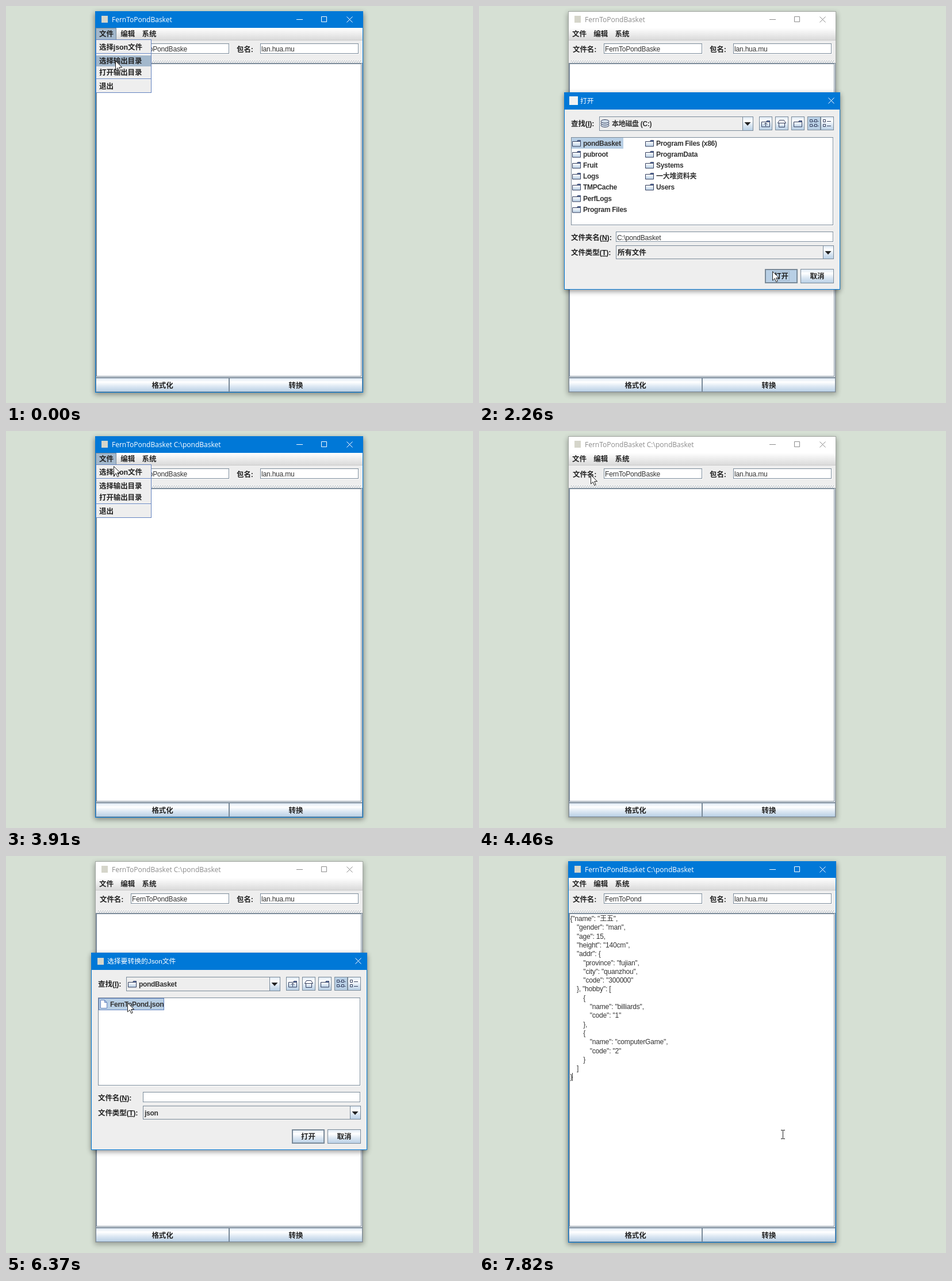
An HTML page for the animation above (8 s loop, 812x690 px).

```html
<!DOCTYPE html>
<html lang="zh">
<head>
<meta charset="utf-8">
<title>Converter demo</title>
<style>
html, body { margin: 0; width: 100%; height: 100%; overflow: hidden; background: #d6e0d4; }
svg { display: block; width: 100vw; height: 100vh; }
text { font: 12px "Liberation Sans", "Noto Sans CJK SC", "Noto Sans CJK", sans-serif; letter-spacing: -.18px; fill: #333; }
.b { font-weight: 700; letter-spacing: -.3px; }
.c { font-size: 12.5px; font-weight: 700; letter-spacing: -.1px; fill: #222; }
.t { font-family: "Open Sans", "Noto Sans CJK SC", "Noto Sans CJK", sans-serif; letter-spacing: 0; }
.w { font-size: 11.8px; fill: #fff; letter-spacing: 0; }
</style>
</head>
<body>
<svg viewBox="0 0 812 690">
  <defs>
    <linearGradient id="btn" x2="0" y2="1">
      <stop stop-color="#dde8f3"/><stop offset=".3" stop-color="#fff"/>
      <stop offset=".6" stop-color="#dde8f3"/><stop offset="1" stop-color="#b8cfe5"/>
    </linearGradient>
    <linearGradient id="bar" x2="0" y2="1"><stop stop-color="#fff"/><stop offset="1" stop-color="#dadada"/></linearGradient>
    <linearGradient id="fold" x2="0" y2="1"><stop stop-color="#fff"/><stop offset="1" stop-color="#b8cfe5"/></linearGradient>
    <pattern id="bumps" x="159" y="94" width="4" height="4" patternUnits="userSpaceOnUse">
      <path d="M0 0h1v1h-1zM2 2h1v1h-1z" fill="#fff"/><path d="M1 1h1v1h-1zM3 3h1v1h-1z" fill="#7a8a99"/>
    </pattern>
    <filter id="blur" x="-10%" y="-10%" width="120%" height="120%"><feGaussianBlur stdDeviation="5"/></filter>
  </defs>
  <g id="scene"></g>
  <g id="pointer"></g>
</svg>
<script>
const LOOP = 8000, BLUE = '#0078d7', LINE = '#7a8a99', PICK = '#b8cfe5', EDGE = '#6382bf', INK = '#333d5c';
const APP = 'FernToPondBasket', FILE = 'FernToPond', DIR = 'pondBasket';

// Pointer stops: time, x, y
const stops = [
  [0, 190, 95], [150, 194, 101], [510, 198, 128], [640, 202, 160], [770, 206, 195],
  [900, 207, 222], [1040, 205, 232], [1170, 204, 236], [1430, 225, 262], [1570, 290, 320],
  [1710, 380, 385], [1850, 455, 435], [1990, 500, 458], [2120, 510, 461],
  [2940, 480, 400], [3070, 380, 250], [3210, 260, 110], [3340, 185, 48], [3480, 176, 46],
  [3910, 187, 61], [4060, 190, 70], [4180, 194, 76], [4880, 197, 115], [5060, 200, 180],
  [5240, 203, 240], [5430, 204, 254], [6130, 207, 254], [6250, 211, 255], [6620, 235, 285],
  [6740, 330, 370], [6870, 440, 440], [6990, 510, 472], [7120, 528, 478], [7240, 528, 482],
  [7670, 528, 484]
];

const folders = [DIR, 'pubroot', 'Fruit', 'Logs', 'TMPCache', 'PerfLogs', 'Program Files',
  'Program Files (x86)', 'ProgramData', 'Systems', '一大堆资料夹', 'Users'];

// Indent level, then text
const json = [
  [0, '{"name": "王五",'], [1, '"gender": "man",'], [1, '"age": 15,'], [1, '"height": "140cm",'],
  [1, '"addr": {'], [2, '"province": "fujian",'], [2, '"city": "quanzhou",'], [2, '"code": "300000"'],
  [1, '}, "hobby": ['], [2, '{'], [3, '"name": "billiards",'], [3, '"code": "1"'], [2, '},'],
  [2, '{'], [3, '"name": "computerGame",'], [3, '"code": "2"'], [2, '}'], [1, ']'], [0, '}']
];

const rect = (x, y, w, h, fill, more = '') => `<rect x="${x}" y="${y}" width="${w}" height="${h}" fill="${fill}" ${more}/>`;
const box = (x, y, w, h, fill, stroke = LINE) => rect(x + .5, y + .5, w - 1, h - 1, fill, `stroke="${stroke}"`);
const sunken = (x, y, w, h) => rect(x + 1, y + 1, w, h, '#fff') + box(x, y, w, h, '#fff');
const path = (d, stroke, fill = 'none') => `<path d="${d}" stroke="${stroke}" fill="${fill}"/>`;
const text = (x, y, s, cls = '', more = '') => `<text x="${x}" y="${y}" class="${cls}" ${more}>${s}</text>`;
const move = (x, y, s) => `<g transform="translate(${x} ${y})">${s}</g>`;
const shadow = (x, y, w, h, o) => rect(x, y + 3, w, h, '#000', `opacity="${o}" filter="url(#blur)"`);
const key = (s, k) => `${s}(<tspan text-decoration="underline">${k}</tspan>):`;
const mid = 'text-anchor="middle"';
const cross = (x, y, c) => path(`M${x} ${y}l10 10m0-10l-10 10`, c);
const appIcon = (x, y) => rect(x, y, 11, 12, '#d5d5ca');
const caret = (x, y) => rect(x, y, 1, 14, '#333');

const folder = (x, y) => move(x, y,
  path('M8.5 3.5l1-2h5v2', INK, EDGE) + path('M.5 3.5h14v8.5h-14z', INK, 'url(#fold)'));

function mainWindow(s) {
  const ink = s.active ? '#fff' : '#8c8c8c';
  let o = shadow(154, 9, 468, 663, s.active ? .42 : .3);
  o += box(155, 9, 466, 663, '#eee', s.active ? BLUE : '#a0a5a0');
  o += rect(156, 10, 464, 28, s.active ? BLUE : '#fff') + appIcon(166, 17);
  o += text(184, 28, APP + (s.chosen ? ' C:\\' + DIR : ''), 't', `style="fill:${ink}"`);
  o += path('M505 23.5h11M548.5 18.5h9v9h-9z', ink) + cross(592.5, 18.5, ink);

  o += rect(156, 38, 464, 21, 'url(#bar)') + rect(156, 59, 464, 1, '#ccc');
  if (s.menu) o += box(156, 38, 36, 21, '#a3b8cc');
  ['文件', '编辑', '系统'].forEach((m, i) => o += text(162 + i * 37.3, 53, m, 'c'));

  o += text(163, 80, '文件名:', 'c') + text(401, 80, '包名:', 'c');
  o += sunken(217, 65, 171, 18) + sunken(442, 65, 171, 18);
  o += text(219, 79, s.loaded ? FILE : APP.slice(0, -1)) + text(444, 79, 'lan.hua.mu');
  o += rect(159, 94, 459, 4, 'url(#bumps)');

  o += box(156, 99, 464, 547, '#fff') + box(157, 100, 461, 544, '#fff');
  if (s.loaded) {
    json.forEach(([n, line], i) => o += text(158.5 + n * 11.4, 113 + i * 15.3, line));
    o += caret(162, 377);
  }
  [['格式化', 156], ['转换', 388]].forEach(([label, x]) =>
    o += box(x, 646, 232, 25, 'url(#btn)') + text(x + 116, 664, label, 'c', mid));
  return o;
}

function popup(s) {
  let o = box(156, 58, 97, 93, '#eee', EDGE);
  if (s.hover === 1) o += rect(157, 61, 95, 20, '#a3b8cc');
  if (s.hover === 2) o += rect(157, 86, 95, 19, '#a3b8cc');
  for (const y of [82, 126]) o += rect(157, y, 95, 1, EDGE) + rect(157, y + 1, 95, 1, '#fff');
  o += text(162, 76, '选择json文件', 'c') + text(162, 100, '选择输出目录', 'c');
  return o + text(162, 120, '打开输出目录', 'c') + text(162, 144, '退出', 'c');
}

function toolbar() {
  let o = '';
  [487, 515, 543, 571, 594].forEach((x, i) => o += box(x, 192, 23, 24, i === 3 ? PICK : 'url(#btn)'));
  o += folder(491, 198) + path('M498.5 209v-6m-3 3l3-3 3 3', INK);
  o += path('M521.5 203.5h10v7h-10z', INK, 'url(#fold)') + path('M519.5 203.5l3-5h8l3 5z', INK, '#fff');
  o += folder(547, 198);
  for (const x of [575.5, 583.5]) for (const y of [197.5, 205.5]) o += path(`M${x} ${y}h4v4h-4zM${x + 5} ${y + 3}h2`, INK);
  for (const y of [197.5, 205.5]) o += path(`M598.5 ${y}h4v4h-4zM605 ${y + 3}h7`, INK);
  return o;
}

function combo(x, y, w, h) {
  return box(x, y, w, h, '#eee') + box(x + w - 19, y, 19, h, 'url(#btn)') +
    `<path d="M${x + w - 15.5} ${y + 10}h11l-5.5 6z" fill="#222"/>`;
}

function disk() {
  let o = '';
  for (const y of [207.5, 204, 200.5])
    o += `<ellipse cx="219" cy="${y}" rx="7" ry="3" fill="#d3deea" stroke="${INK}"/>`;
  return o;
}

function dialog(s) {
  const json2 = s.dialog === 2;
  let o = shadow(148, 150, 480, 343, .42) + box(148, 150, 480, 343, '#eee', BLUE) + rect(148, 150, 480, 30, BLUE);
  o += json2 ? appIcon(159, 159) : rect(157, 157, 15, 15, '#f2f2f2');
  o += text(176, 169, json2 ? '选择要转换的Json文件' : '打开', 'w') + cross(607.5, 159.5, '#fff');

  o += text(160, 209, key('查找', 'I'), 'c') + combo(209, 192, 268, 25) + toolbar();
  o += s.inside ? folder(212, 198) + text(231, 209, DIR, 'b') : disk() + text(231, 209, '本地磁盘 (C:)', 'b');

  o += sunken(160, 228, 456, 153);
  if (s.inside) {
    if (s.filePick) o += box(161, 229, 114, 21, PICK, EDGE);
    o += path('M164.5 232.5h7l4 4v10h-11zM171.5 232.5v4h4', EDGE, '#fff');
    o += text(181, 244, FILE + '.json', 'b');
  } else {
    if (s.dirPick) o += rect(161, 229, 90, 19, PICK);
    folders.forEach((name, i) => {
      const x = i < 7 ? 162 : 289, y = Math.round(239 + (i % 7) * 19.1);
      o += folder(x, y - 7) + text(x + 19, y + 4, name, 'b');
    });
  }

  o += text(160, 407, key(json2 ? '文件名' : '文件夹名', 'N'), 'c') + sunken(238, 392, 378, 18);
  if (!json2 && !s.dirPick) o += rect(240, 394, 15, 15, PICK);
  o += text(240, 407, s.field);
  if (!s.dirPick && !s.inside) o += caret(json2 ? 240 : 255, 394);
  o += text(160, 433, key('文件类型', 'T'), 'c') + combo(238, 416, 379, 24);
  o += text(241, 433, json2 ? 'json' : '所有文件', json2 ? 'b' : 'c');

  o += box(497, 457, 57, 25, s.pressed ? PICK : 'url(#btn)') + box(498, 458, 55, 23, 'none');
  if (s.pressed) o += box(511, 461, 29, 17, 'none', '#a3b8cc');
  o += box(559, 457, 58, 25, 'url(#btn)');
  o += text(525.5, 474, '打开', 'c', mid) + text(588, 474, '取消', 'c', mid);
  return move(0, json2 ? 18 : 0, o);
}

function stateAt(t) {
  const within = (a, b) => t >= a && t < b;
  const two = within(4610, 7670);
  return {
    active: t < 150 || within(2540, 4460) || t >= 7670,
    chosen: t >= 2540,
    menu: t < 150 || within(3480, 4460),
    hover: t < 150 ? 2 : within(4060, 4460) ? 1 : 0,
    dialog: within(270, 2540) ? 1 : two ? 2 : 0,
    dirPick: within(1290, 2540) || within(5430, 5860),
    inside: within(5860, 7670),
    filePick: t >= 6370,
    pressed: within(2260, 2540) || within(7390, 7670),
    field: two ? (t >= 6490 ? FILE + '.json' : '') : t >= 1290 ? 'C:\\' + DIR : 'C:\\',
    loaded: t >= 7670
  };
}

function pointer(t, s) {
  const [, x, y] = stops.findLast(p => p[0] <= t);
  const beam = !s.dialog && s.active && !s.menu && y > 100;
  return move(x, y, beam
    ? path('M-3 -7.5h3l.5 .5 .5 -.5h3M.5 -7v14M-3 7.5h3l.5 -.5 .5 .5h3', '#222')
    : path('M.5 .5v15.5l3.7-3.5 2.5 6 2.5-1.1-2.5-5.8h5z', '#222', '#fff'));
}

const scene = document.getElementById('scene'), hand = document.getElementById('pointer');
let shown = '', pointed = '';

function draw(t) {
  const s = stateAt(t), id = JSON.stringify(s), p = pointer(t, s);
  if (id !== shown) {
    scene.innerHTML = mainWindow(s) + (s.menu ? popup(s) : '') + (s.dialog ? dialog(s) : '');
    shown = id;
  }
  if (p !== pointed) hand.innerHTML = pointed = p;
}

const start = performance.now();
function tick() {
  draw((performance.now() - start) % LOOP);
  requestAnimationFrame(tick);
}
tick();
</script>
</body>
</html>
```
